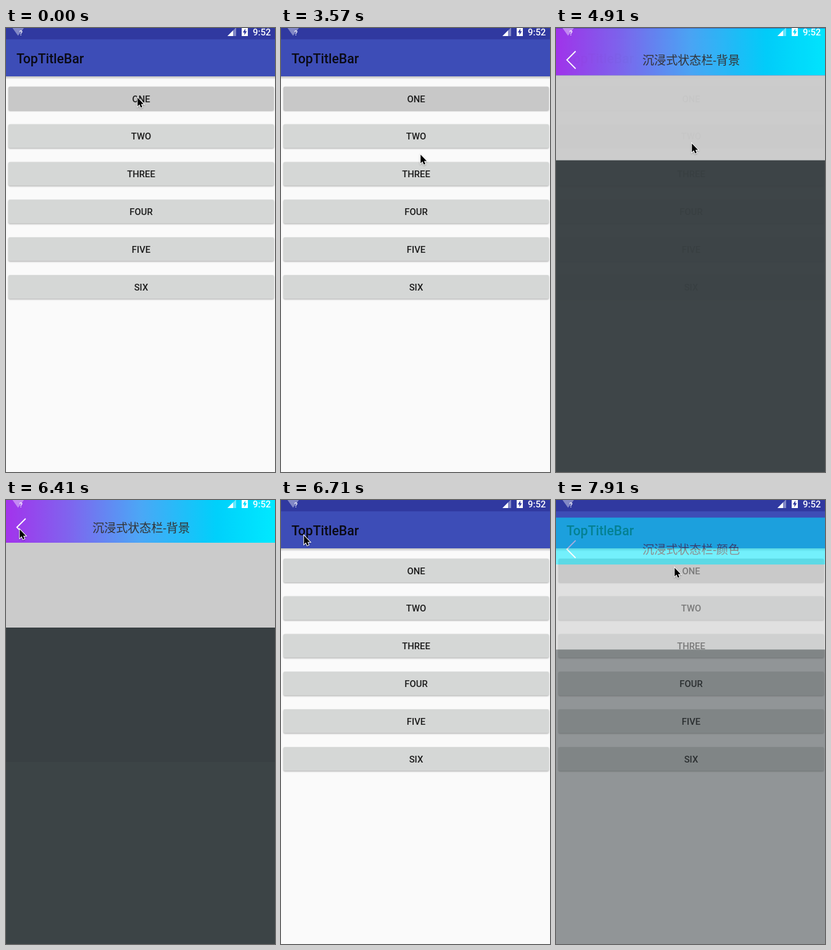
Write an HTML page that moves like this. It is 436 px wide and 717 px high and loops after 8000 ms.

```html
<!DOCTYPE html>
<html lang="zh">
<head>
<meta charset="utf-8">
<title>TopTitleBar</title>
<style>
  html, body { margin: 0; width: 100%; height: 100%; overflow: hidden; background: #fafafa; }
  svg { display: block; width: 436px; height: 717px; }
  text { font-family: Roboto, "Noto Sans CJK SC", "Noto Sans CJK", sans-serif; }
  .medium { font-weight: 500; }
  .label { font-size: 14.86px; fill: #1c1c1c; text-anchor: middle; }
  .button { filter: drop-shadow(0 1px 1px rgba(0, 0, 0, .32)); }
  #cursor { filter: drop-shadow(0 1px 1px rgba(0, 0, 0, .3)); }
</style>
</head>
<body>
<svg viewBox="0 0 436 717">
  <defs>
    <linearGradient id="rainbow">
      <stop offset="0" stop-color="#a333ec"/>
      <stop offset=".23" stop-color="#8063ee"/>
      <stop offset=".5" stop-color="#4ba7f6"/>
      <stop offset=".78" stop-color="#00d0fb"/>
      <stop offset="1" stop-color="#00e9ff"/>
    </linearGradient>
    <linearGradient id="shade" x2="0" y2="1">
      <stop offset="0" stop-opacity=".24"/>
      <stop offset="1" stop-opacity="0"/>
    </linearGradient>
  </defs>

  <g id="home">
    <rect width="436" height="717" fill="#fafafa"/>
    <rect y="78" width="436" height="5" fill="url(#shade)"/>
    <rect y="18" width="436" height="60" fill="#3d4db7"/>
    <rect width="436" height="18.3" fill="#3039a0"/>
    <text class="medium" x="17" y="56.5" font-size="21.2" fill="#0a0a14">TopTitleBar</text>
  </g>

  <g id="page">
    <rect id="header" y="-7" width="436" height="76"/>
    <rect y="69" width="436" height="137" fill="#cbcbcb"/>
    <rect y="206" width="436" height="520" fill="#394043"/>
    <rect id="lower" y="423" width="436" height="300" fill="#3c4446"/>
    <path d="M31.8 30L17.7 44.1L31.8 58.2" fill="none" stroke="#fff" stroke-width="1.9"/>
    <text id="title" x="219" y="51.5" font-size="19.1" fill="#333" text-anchor="middle"></text>
  </g>

  <g id="status" fill="#fff">
    <path d="M10.5 0H29L19.5 12.5Z" opacity=".4"/>
    <text class="medium" x="21.5" y="12" font-size="11">?</text>
    <path d="M359 13L373 -1V13Z" opacity=".4"/>
    <path d="M359 13L368 4V13Z"/>
    <path fill-rule="evenodd" d="M382 -1H392V13H382ZM388 1L383.8 7.3H386.4V11.5L390.4 5.3H388Z"/>
    <text class="medium" x="400" y="11.8" font-size="14.86">9:52</text>
  </g>

  <path id="cursor" d="M0 0V14L3.1 11L5.2 16L7.6 15L5.6 10.2H9.8Z"
        stroke="#fff" stroke-width="2" paint-order="stroke"/>
</svg>
<script>
const LOOP = 8000, FIRST = 880, TICK = 149;   // the screen refreshes once per tick
const OPEN = 4784, CLOSE = 6402, REOPEN = 7848;
const $ = id => document.getElementById(id);
const clamp = v => Math.min(1, Math.max(0, v));
const smooth = v => v * v * (3 - 2 * v);

// Pointer moves: [from tick, to tick, x, y]
const home = [212, 111];
const moves = [
  [-1, 2, 240, 15], [2, 4, 225, 111], [4, 6, 224, 122],
  [7, 10, 240, 1], [10, 12, 224, 126], [13, 15, 224, 118],
  [17, 18, 225, 203], [18, 23, 219, 185],
  [29, 35, 21, 46], [38, 39, 36, 56], [39, 43, 191, 108]
];

// Darkened buttons: [button, from tick, to tick]
const presses = [[0, -9, 25], [1, 23, 38], [0, 45, 99]];

function pointer(tick) {
  let [x, y] = home;
  for (const [from, to, toX, toY] of moves) {
    const p = smooth(clamp((tick - from) / (to - from)));
    x += (toX - x) * p;
    y += (toY - y) * p;
  }
  return [x, y];
}

const enter = age => ({
  shift: 60 * (1 - clamp(age / 350)) ** 5,
  alpha: 1 - (1 - clamp(age / 200)) ** 4
});
const leave = age => ({
  shift: 60 * clamp(age / 250) ** 4,
  alpha: 1 - clamp((age - 100) / 150)
});

function page(t) {
  if (t >= REOPEN) return enter(t - REOPEN);
  return t >= CLOSE ? leave(t - CLOSE) : enter(t - OPEN);
}

function add(tag, attrs, text = "") {
  const el = document.createElementNS("http://www.w3.org/2000/svg", tag);
  for (const k in attrs) el.setAttribute(k, attrs[k]);
  el.textContent = text;
  return $("home").appendChild(el);
}

const buttons = ["ONE", "TWO", "THREE", "FOUR", "FIVE", "SIX"].map((name, i) => {
  const y = 94.7 + i * 60.85;
  const box = add("rect", { class: "button", x: 4, y, width: 430, height: 38.2, rx: 2 });
  add("text", { class: "label medium", x: 219, y: y + 24.9 }, name);
  return box;
});

function draw(time) {
  const tick = Math.floor((time - FIRST) / TICK);
  const t = FIRST + tick * TICK;

  const [x, y] = pointer(tick);
  $("cursor").setAttribute("transform", `translate(${Math.round(x) + 1.3} ${Math.round(y) + 1.5})`);

  const { shift, alpha } = page(t);
  const second = t >= REOPEN;
  $("page").setAttribute("transform", `translate(0 ${shift})`);
  $("page").setAttribute("opacity", alpha);
  $("header").setAttribute("fill", second ? "#00e8ff" : "url(#rainbow)");
  $("lower").setAttribute("opacity", shift > 1 ? 0 : 1);
  $("title").textContent = "沉浸式状态栏-" + (second ? "颜色" : "背景");

  buttons.forEach((b, i) => {
    const dark = presses.some(([n, from, to]) => n === i && tick >= from && tick < to);
    b.setAttribute("fill", dark ? "#c8c8c8" : "#d5d7d6");
  });
}

const start = performance.now();
function run() {
  draw((performance.now() - start) % LOOP);
  requestAnimationFrame(run);
}
run();
</script>
</body>
</html>
```
